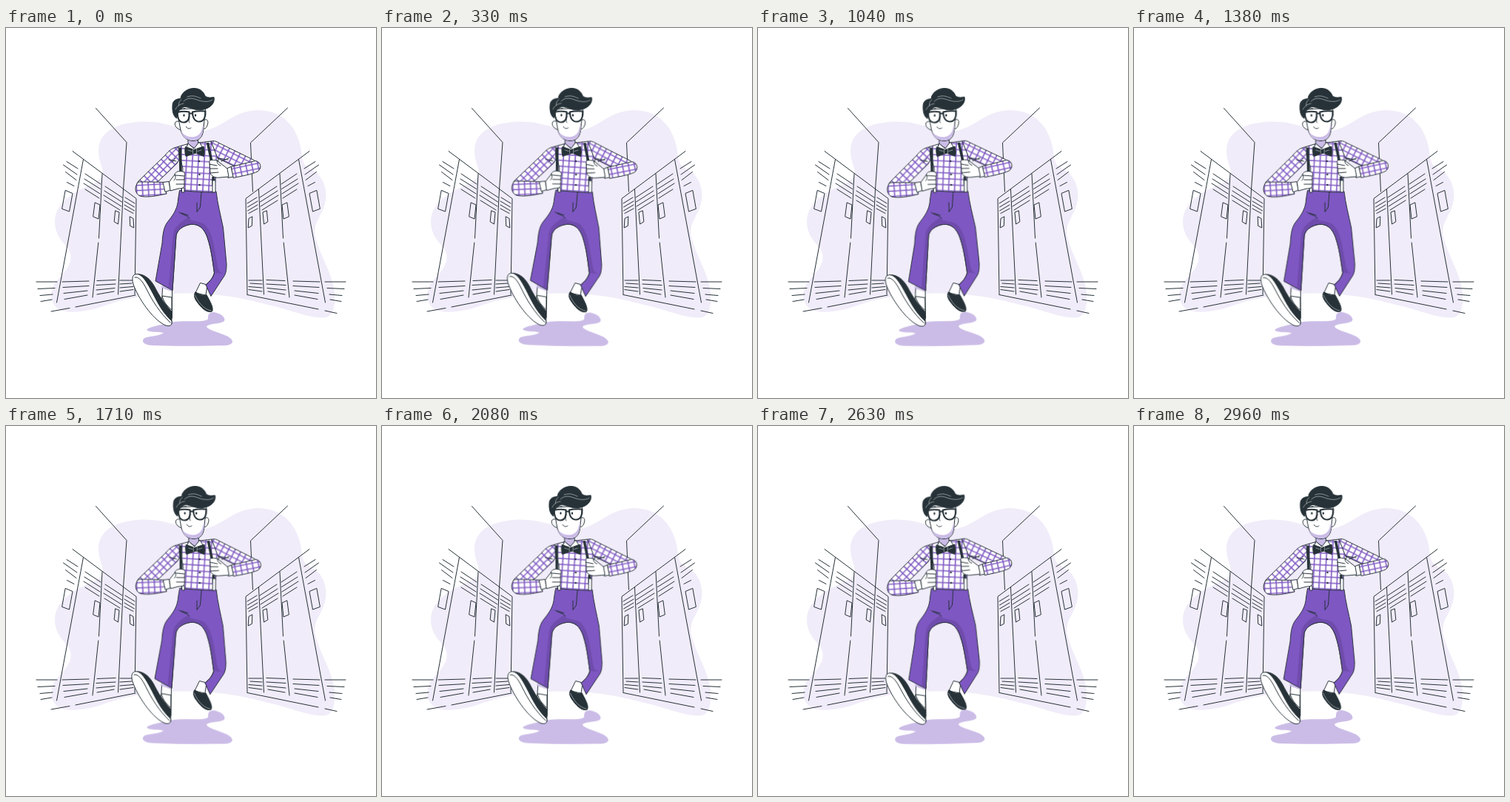
Animation, 500 px wide and 500 px high, one loop 3000 ms. Source, as an HTML page:

```html
<!DOCTYPE html>
<html lang="en">
<head>
<meta charset="utf-8">
<title>Hallway walk</title>
<style>
  html, body { margin: 0; width: 100%; height: 100%; overflow: hidden; background: #fff; }
  svg { display: block; width: 100vw; height: 100vh; }
  .line { fill: none; stroke: #263238; stroke-width: 1; stroke-linecap: round; stroke-linejoin: round; }
  .skin { fill: #fff; stroke: #263238; stroke-width: 1; stroke-linejoin: round; }
  .dark { fill: #263238; stroke: #263238; stroke-width: 1; stroke-linejoin: round; }
  .shade { fill: #cbbce7; }
  .pants { fill: #7e57c2; stroke: #263238; stroke-width: 1; stroke-linejoin: round; }
  .fold { fill: #6f4cac; }
  .check { fill: none; stroke: #7e57c2; stroke-width: 1.6; }
  .shirt { stroke: #263238; stroke-width: 1; stroke-linejoin: round; }
  .gleam { fill: none; stroke: #b9bfc2; stroke-width: .7; stroke-linecap: round; }
  .sway { animation: sway 1.5s linear infinite; }
  #figure { transform-origin: 257px 242px; }
  #shadow { transform-origin: 246px 407px; }
  @keyframes sway {
    0%, 100% { transform: rotate(0deg); }
    25% { transform: rotate(1deg); }
    75% { transform: rotate(-1deg); }
  }
</style>
</head>
<body>
<svg viewBox="0 0 500 500" xmlns="http://www.w3.org/2000/svg">
  <defs>
    <pattern id="torso" width="8" height="8" patternUnits="userSpaceOnUse" patternTransform="translate(241 159) rotate(3)">
      <rect width="8" height="8" fill="#fff"/><path class="check" d="M4 0V8M0 4H8"/>
    </pattern>
    <pattern id="sleeveL" width="8" height="7" patternUnits="userSpaceOnUse" patternTransform="translate(180 210) rotate(-46)">
      <rect width="8" height="7" fill="#fff"/><path class="check" d="M4 0V7M0 3.5H8"/>
    </pattern>
    <pattern id="foreL" width="8" height="7" patternUnits="userSpaceOnUse" patternTransform="translate(180 209) rotate(-3)">
      <rect width="8" height="7" fill="#fff"/><path class="check" d="M4 0V7M0 3.5H8"/>
    </pattern>
    <pattern id="sleeveR" width="8" height="7" patternUnits="userSpaceOnUse" patternTransform="translate(284 154) rotate(27)">
      <rect width="8" height="7" fill="#fff"/><path class="check" d="M4 0V7M0 3.5H8"/>
    </pattern>
    <pattern id="foreR" width="8" height="7" patternUnits="userSpaceOnUse" patternTransform="translate(304 187) rotate(-12)">
      <rect width="8" height="7" fill="#fff"/><path class="check" d="M4 0V7M0 3.5H8"/>
    </pattern>
    <g id="lockers">
      <path d="M90 166.500L176 230.500L174 360M104.500 177.500L68.500 371M130 197L125.500 284M124.800 290L117 364M158.500 218L151.500 360"/>
      <path d="M82 180.500L97 190M77.500 185L96 198M80.500 194.500L95 205.500M82.500 208.500L92 213.500"/>
      <path d="M107 197L128 211M106 204L127.500 217.500M105 210L127 224M107 218L126 230"/>
      <path d="M134 214L157 229M133 220L156.500 235M132 226L156 241M133 233L154 246"/>
      <path d="M161 229L174 237M160 234L173.500 242M160 239L173.500 247M160 244L172 250.500"/>
      <path d="M80.500 219.500L90 223.500L85.500 248L76 244.500Z M120.500 236L127 239L125 258L118 255Z M148 247L153 249L151.500 265L146.500 262Z M167.500 255L172 257.500L172.800 270L168 267.500Z"/>
      <path d="M41 343H69M43 352.500L66 351.500M46 361.500L63 360M47 369.500L62 367M76 343L112 342M77 350.500L112 348.500M78 358.500L110 355M79 366.500L110 361"/>
      <path d="M123 341.500L148 340.500M122 347.500L148 346M122 354L147 351.500M123 360L146 356M154 341H172M154 346L170 345M154 351L172 349.500M154 356L172 353.500"/>
    </g>
  </defs>

  <path fill="#f1ecf9" d="M125 165C126 142 145 129 182 126.500C215 125 235 138 262 139.500C292 138 305 111 342 111C372 112 391 130 398 160C402 185 400 184 416 193C431 203 436 224 430 241C424 258 415 264 418 282C424 308 441 330 444 358C445 378 442 390 430 391.500C407 392 390 382 350 373C316 364 286 359 248 358.500C206 358 168 363 137 374C112 383 91 386 76 382C57 375 58 353 70 340C80 329 90 318 87 305C84 292 68 288 66 264C65 239 87 225 107 215C127 207 133 203 130 190C127 180 125 174 125 165Z"/>

  <g class="line">
    <path d="M121.500 108.500L163 154.500L158.500 218M380.500 108L330.500 155L333.500 221"/>
    <path d="M61 383L86 378.500M94 377L175 361M326 360.500L422 380M431 382L447 385.500"/>
    <use href="#lockers"/>
    <use href="#lockers" transform="matrix(-1 0 0 1 500 0)"/>
  </g>

  <path id="shadow" class="shade sway" d="M190 408C194 403 208 402 222 398C240 394 270 399 273 393C273 388 273 384 281 384C291 386 297 391 295 396C291 400 275 399 271 403C271 408 291 412 300 417C309 422 308 428 296 429C260 430 225 430 200 429C186 429 183 424 186 420C190 416 207 417 213 412C207 410 194 412 190 408Z"/>

  <g id="figure" class="sway">
    <!-- feet -->
    <path class="skin" d="M262.500 344.500L272 347L270 361L256 358Z"/>
    <path class="dark" d="M256 356.500C252 363 257 369 262 375C267 381 273 385 278.500 383C281 378 276 370 271 360.500C268 362.500 262 361 256 356.500Z"/>
    <path class="gleam" d="M255.500 361C260 371 267 380 277 382"/>
    <path class="skin" d="M212 344L224.500 350V392L210 378Z"/>
    <path class="shade" d="M212 344L224.500 350L223.500 356L210 351Z"/>
    <path class="dark" d="M178 332.500C189 333 196 341 201 350C206 360 214 373 224 383V400L210 390Z"/>
    <path class="skin" d="M177 332.500C170 332.500 169.500 340 173 349C182 371 201 396 216 402C222 403.500 224.500 402 224 396C210 383 204 369 196 354C190 343 184 333 177 332.500Z"/>
    <path class="line" d="M174 337C180 335 186 345 190 353C198 369 208 385 222 398"/>
    <path class="skin" d="M211 362L224 364V381C218 376 213 370 211 362Z"/>

    <!-- trousers -->
    <path class="pants" d="M234.500 219.500L284 221C286 238 290 253 293.500 270L298 319C298 328 297 333 293 338L277 362.500L270 347C276 342 280 337 281.500 331C279 313 277 298 273 286C269 272 261 264 249 265.500C240 267 232 272 230 280L225 354.500L202 342L211 291C212 274 214 267 220 260C228 250 232 242 232.500 232Z"/>
    <path class="fold" d="M246 256C233 264 228 269 226 278L219.500 351L225 354L230 280C232 272 240 267 249 265.500C261 264 269 272 273 286C277 298 279 313 281.500 331L296 332C289 332 286 327 285 316C281 294 279 275 268 265C260 260 251 263 246 256Z"/>
    <path class="line" d="M264 222L262.500 242L258 248.500L258 236M234 249C239 253 243 252 248 257M237 250L246 253"/>
    <path class="line" d="M225 354.500L230 280C232 272 240 267 249 265.500C261 264 269 272 273 286C277 298 279 313 281.500 331C280 337 276 342 270 347"/>

    <!-- torso -->
    <path class="shade" d="M246 147H260V162L254 165L246 161Z"/>
    <path class="shirt" fill="url(#torso)" d="M232 160.500L246 156.500L255 163L261 155L277 153L287 177L283 205L281 222C266 222 251 221 237 219.500L239 190Z"/>
    <path class="line" d="M246 149V160M259.500 150V158"/>
    <path class="skin" d="M246 156L243 164L254 166L266 162L261 154L254 163Z"/>
    <path d="M235.500 161.500L236 196M272.500 155L278 181M280 201V212" fill="none" stroke="#263238" stroke-width="3.600"/>
    <path class="skin" d="M237.500 216H241V222H237.500Z M279 206H283V222H279Z"/>
    <path class="dark" d="M242.500 160.500L254 164.500L267 160C268.500 165 268.500 169 267.500 173.500L256 169L243 173.500C241.500 168 241.500 164 242.500 160.500Z"/>
    <path class="gleam" d="M252.500 163.500V169.500M257.500 163.500V169.500M246 165L251 166.500M264 165L259 166.500"/>
    <g fill="#263238"><circle cx="261" cy="180" r="1.200"/><circle cx="261.500" cy="198" r="1.200"/><circle cx="261.500" cy="212" r="1.200"/></g>

    <!-- arms -->
    <path class="shirt" fill="url(#sleeveL)" d="M233 160.500C224 162 220 166 215 172L179 207C174 213 177 218 184 217L206 207L231 183L234 178Z"/>
    <path class="shirt" fill="url(#foreL)" d="M179 208C173 214 174 224 181 227C190 229.500 203 227 217 224L214 208.500C203 208 190 208 179 208Z"/>
    <path class="line" d="M220 178L230 180M224 182L229 176"/>
    <path class="skin" d="M212 208.500L220 207.500L222.500 219L215 221.500Z"/>
    <path class="skin" d="M220.500 208L228 198C229 194 233 193 239 194C242 195 242 198 241 201L241 213C241 216 237 217 233 217L222 220Z"/>
    <path class="line" d="M229 199L241 200M230 205H241M230 211H241M228 198C230 201 229 204 227 206"/>

    <path class="shirt" fill="url(#sleeveR)" d="M277 153C281 152 284 153 289 156L334 178C340 181 339 186 333 187L307 186L286 176Z"/>
    <path class="shirt" fill="url(#foreR)" d="M304 187.500L337 179.500C345 181 346 190 340 194C331 198 319 200 307 202.500Z"/>
    <path class="line" d="M286 176L300 178M291 180L301 176"/>
    <path class="skin" d="M298 190L304 187.500L307 201L300 202.500Z"/>
    <path class="skin" d="M275 181C274 178 280 178 285 179L299 190L301 201L289 202C283 203 277 200 276 196Z"/>
    <path class="line" d="M275 184L285 186M276 190H286M276 196L287 195M285 179C285 183 287 185 290 186"/>

    <!-- head -->
    <path class="skin" d="M236 127C228 123 226 131 231 135C233 137 236 138 238 138Z"/>
    <path class="skin" d="M266 126C271 121 274 125 272.500 130C271 135 269 137 266 136Z"/>
    <path class="skin" d="M231 110L235 133C237 147 244 152.500 253 152.500C263 152.500 266.500 145 267 135L269.500 108Z"/>
    <path class="shade" d="M236.500 139C242 149 259 151 264 139L267 128C267 144 263 152 253 152C243 152 238 146 236.500 139Z"/>
    <path class="line" d="M248 119C248 123 246 126 248 128M243.500 133.500C245 136.500 248 136.500 250 135M236 110L242 108.500M256 109L263 110.500"/>
    <g fill="#263238"><ellipse cx="240.500" cy="118" rx="1.200" ry="1.800"/><ellipse cx="256" cy="118" rx="1.200" ry="1.800"/></g>
    <path d="M231.500 114C237 112.500 243 112.500 247.500 113.500C248 120 247 127 241 127.500C234 128 231.500 122 231.500 114ZM252 113.500C258 112 264 112 269.500 112.500C270 119 268 126 262 126.500C255 127 252 121 252 113.500ZM247.500 115.500H252" fill="none" stroke="#263238" stroke-width="2"/>
    <path class="dark" d="M230.500 122C226 119 224.500 112 225 105C225 99 229 95.500 236 95.500C236 89 244 81.500 254 81.500C262 81.500 267 86 269 92C274 95 277 94 281 93.500C283 102 275 109 265 110.500C255 112 249 107 241 106.500C236 109 232 111 230.500 122Z"/>
    <path class="gleam" d="M237 96.500C234 99 233 102 233.500 105M240 99C247 92 255 96 261 98C268 100 275 100 279 97M245 93C253 90 258 93 263 95M229 110C231 106 234 103 240 102"/>
  </g>
</svg>
</body>
</html>
```
